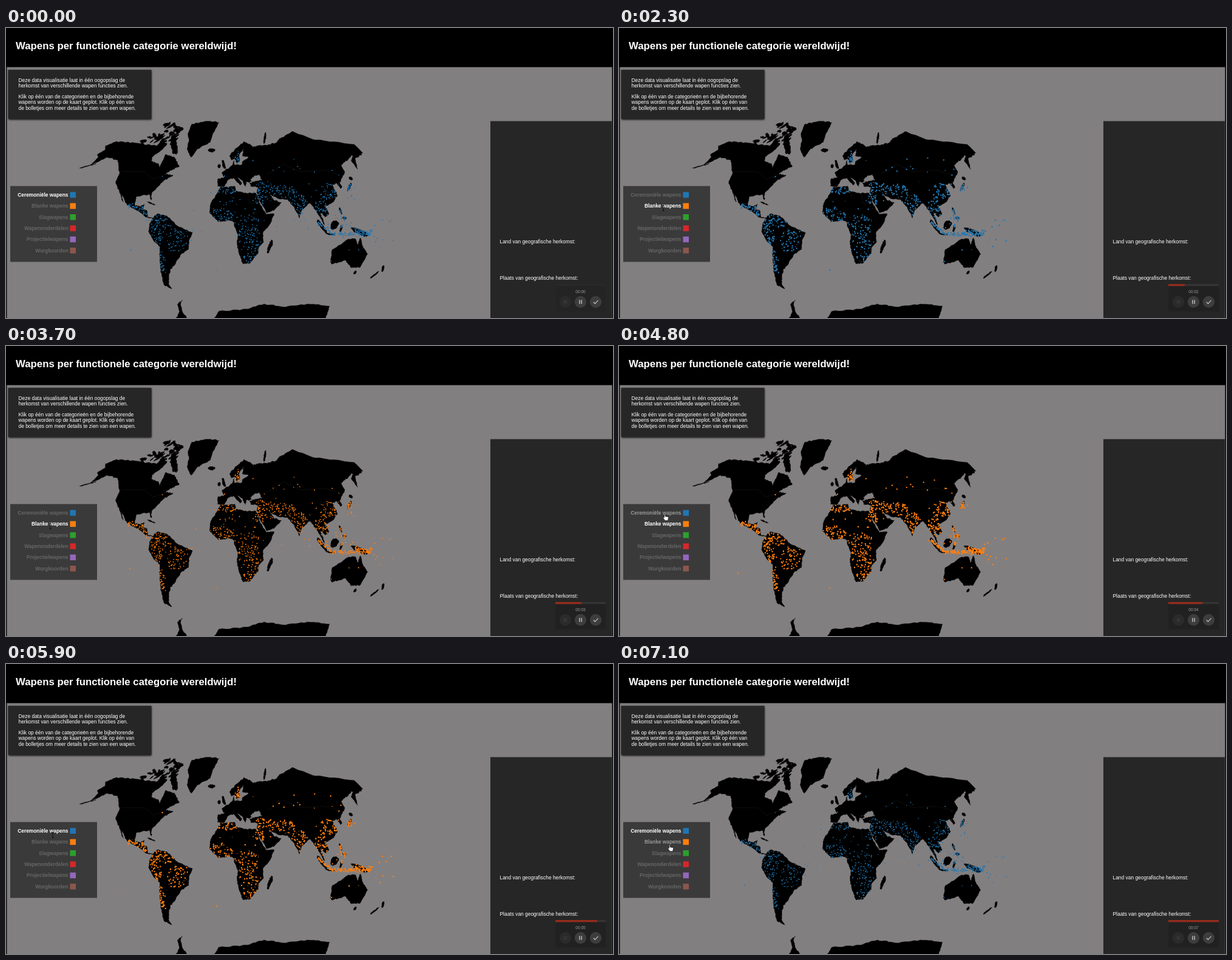
Animation, 1000 px wide and 478 px high, one loop 7.2 s. Source, as an HTML page with a canvas:

```html
<!DOCTYPE html>
<html lang="nl">
<head>
<meta charset="utf-8">
<style>
html, body { margin: 0; width: 100%; height: 100%; overflow: hidden; background: #827f80; }
canvas { display: block; }
</style>
</head>
<body>
<canvas id="stage" width="1000" height="478"></canvas>
<script>
const ctx = document.getElementById('stage').getContext('2d');
const LOOP = 7200, GREY = '#827f80', PANEL = '#262626';
const FONT = '"Liberation Sans", Arial, sans-serif';
const LABELS = ['Ceremoniële wapens', 'Blanke wapens', 'Slagwapens', 'Wapenonderdelen', 'Projectielwapens', 'Wurgkoorden'];
const COLORS = ['#1f77b4', '#ff7f0e', '#2ca02c', '#d62728', '#9467bd', '#8c564b'];
const TO_ORANGE = 1700, TO_BLUE = 5300;

let seed = 11;
const rnd = () => (seed = (seed * 16807) % 2147483647) / 2147483647;
const range = (a, b) => a + (b - a) * rnd();
const clamp = v => Math.max(0, Math.min(1, v));
const mix = (a, b, p) => a + (b - a) * p;
const easeOut = p => 1 - (1 - p) ** 2;
const rows = (str, size) => {
  const n = str.trim().split(/\s+/).map(Number);
  return Array.from({ length: n.length / size }, (_, i) => n.slice(i * size, i * size + size));
};

// longitude, latitude -> stage
const project = (lon, lat) => [
  362 + lon * (1.57 - 6e-5 * lat ** 2 - 4.5e-9 * lat ** 4),
  327 - lat * (1.72 + 5e-5 * lat ** 2)
];

// closed outline with a ragged coast
const shapes = [];
function land(corners) {
  const path = new Path2D();
  corners.forEach(([x, y], i) => {
    const [u, v] = corners[(i + 1) % corners.length];
    const steps = Math.min(8, Math.ceil(Math.hypot(u - x, v - y) / 1.5));
    for (let k = 0; k < steps; k++) {
      const r = k ? 0.45 : 0;
      path.lineTo(...project(mix(x, u, k / steps) + range(-r, r), mix(y, v, k / steps) + range(-r, r)));
    }
  });
  path.closePath();
  shapes.push(path);
}

function isle(lon, lat, long, wide, angle) {
  const turn = angle * Math.PI / 180, c = Math.cos(turn), s = Math.sin(turn);
  land(Array.from({ length: 12 }, (_, i) => {
    const a = i * Math.PI / 6, r = range(0.8, 1.15);
    const u = long * r * Math.cos(a), v = wide * r * Math.sin(a);
    return [lon + u * c - v * s, lat + u * s + v * c];
  }));
}

const CONTINENTS = {
  northAmerica: `-166 68 -156 71 -128 70 -95 68 -92 72 -82 69 -87 64 -94 60 -92 57 -82 55 -79 51.5 -78 62
    -65 60 -56 53 -66 50 -70 47 -61 46 -70 42 -76 36 -81 31 -80 25 -83 30 -97 28 -97 20 -91 18.5 -87 21
    -88 16 -83.5 15 -82 9 -77 8 -83 8.5 -95 16 -105 20 -114 31 -110 23 -117 33 -124 40 -124 48 -135 58
    -150 60 -164 54.5 -162 60 -166 62 -161 65`,
  southAmerica: `-77 8 -72 12 -62 10 -50 0 -35 -6 -39 -14 -40 -22 -48 -26 -57 -36 -62 -39 -66 -46 -68 -52
    -66 -55 -74 -52 -73 -38 -70 -19 -76 -14 -81 -5 -80 1`,
  africa: `-6 36 10 37 11 33 20 31 33 31 37 20 43 11.5 51 12 47 3 39 -6 40 -15 35 -20 35 -25 27 -34
    19 -34.5 15 -27 12 -17 13 -8 9 0 9 4 4 6 -8 4.5 -17 13 -16 22 -10 30`,
  europe: `62 68.5 44 68 34 66.5 40 67 26 71 13 66 5 61 7 58 11 59 14 55.5 17 57 17.5 62 24 65.8 21.5 61
    29 60 21 57 20 54.5 11 54 10 57.5 8 54 -1.5 49.5 -4.5 48.3 -1.5 44 -9 43 -9 37 -2 36.7 3 42.5 9 44
    16 38 18 40 12.5 45 19 42 22 36.8 23 40.5 29 41 28 43 34 46 39 47 41.5 41.5 62 39`,
  asia: `49 45 41.5 42 36 41.5 27 40 28 36.8 36 36.5 34 31 35 28 43 13 52 16 59.5 22.5 51.5 25 48 30 57 26
    67 25 73 18 77.5 8 80 15 90 22 95 16 98.5 10 103.5 1.4 100 13 105 9 109 12 106 19 114 22.5 121.5 29
    119 38 125 39.5 127 35 129 36 128 40 140 49 140 54 155 59 164 62 156 57 157 51 163 59 179 63 179 69
    130 72 105 77.5 80 73 70 70 58 68.6`,
  australia: '114 -22 130 -12 137 -12 140 -17.5 142 -11 146 -19 153 -26 150 -37.5 140 -38 131 -31.5 118 -35 115 -33',
  greenland: '-30 84 -58 82 -58 76 -53 72 -52 66 -44 60 -38 66 -22 70.5 -20 76 -12 83',
  antarctica: '-18 -76 -10 -71 30 -69.5 52 -66 78 -68 110 -66 142 -67.5 152 -76',
  peninsula: '-57 -63.3 -61 -66 -62 -72 -57 -77 -76 -76 -66 -71 -65 -66'
};
Object.values(CONTINENTS).forEach(c => land(rows(c, 2)));

// longitude, latitude, half length, half width, angle
rows(`101 0 8 1.6 -48
110 -7.4 5 .7 -8
114 1 5 3.5 50
121 -2 3.5 1.1 80
141 -5.5 10 2.3 -22
121.5 15 3.5 1 -75
125 8 2 1.5 0
137.5 36.5 5.5 1 42
143 43.5 2 1.4 0
176 -38.5 3.2 1.2 -60
170.5 -44 4 1 45
147 -42 1.5 1.4 0
47 -19 6.5 1.8 70
-2.5 54.5 4 1.5 115
-8 53.3 1.7 1.5 0
-19 65 4.5 1.2 0
-79.5 21.8 4.5 .5 -18
58 73.5 6 1 40
-72 68.5 11 2.8 -40
-167 53.5 8 .4 12`, 5).forEach(r => isle(...r));
// Arctic archipelago
for (let i = 0; i < 30; i++) {
  const lat = range(69.5, 82), west = mix(122, 100, (lat - 69.5) / 13);
  isle(-range(72, west), lat, range(1.5, 6), range(0.4, 1.2), range(-25, 35));
}

const borders = ['-123 49 -95 49 -83 43 -75 45 -68 47', '48 47 61 51 70 55 87 49 116 50 131 47',
  '25 31 25 22 37 22'].map(str => {
  const path = new Path2D();
  rows(str, 2).forEach(p => path.lineTo(...project(...p)));
  return path;
});

const dots = [];
const onLand = (x, y) => shapes.some(s => ctx.isPointInPath(s, x, y));
const addDot = ([x, y]) => dots.push({ x, y, delay: rnd(), roams: rnd() < 0.15 });

function scatter(count, place, sea = 0.03) {
  for (let tries = 0; count > 0 && tries < 2000; tries++) {
    const p = project(...place());
    if (onLand(...p) || rnd() < sea) { addDot(p); count--; }
  }
}

// longitude, latitude, spread both ways
rows(`-100 18 5 3
-88 14 5 4
-67 5 11 5
-74 -9 5 9
-52 -14 9 9
-70 -33 3 8
-5 11 11 6
2 34 10 3
22 0 12 10
28 -22 9 9
37 27 4 6
44 35 11 5
66 33 8 5
79 20 7 9
102 16 6 8
113 32 9 6
137 36 5 3
15 60 3 4
143 -5 8 4
122 8 4 7`, 4).forEach(([lon, lat, w, h]) => scatter(6 * Math.sqrt(w * h), () => {
  const a = range(0, 2 * Math.PI), d = 1.25 * Math.sqrt(rnd());
  return [lon + w * d * Math.cos(a), lat + h * d * Math.sin(a)];
}));
// island arc from Sumatra to New Guinea, thin spread elsewhere
scatter(150, () => {
  const u = rnd();
  return [mix(97, 155, u), mix(-8, 4, clamp(1 - 4 * u)) + range(-1, 1 + 4 * u)];
}, 0.6);
scatter(70, () => [range(-75, 153), range(-35, 60)], 0);
scatter(12, () => [range(155, 178), range(-20, 6)], 1);
rows('-177 -17 -152 -17 -140 -12 -109 -27 -10 -40', 2).forEach(p => addDot(project(...p)));

function drawDots(color, sinceIn, sinceOut) {
  ctx.fillStyle = color;
  ctx.beginPath();
  dots.forEach((d, i) => {
    const grow = easeOut(clamp((sinceIn - d.delay * 900) / 3000));
    const shrink = clamp((sinceOut - 250 - d.delay * 800) / 500);
    const r = 1.2 * grow * (1 - shrink);
    if (r < 0.1) return;
    const from = d.roams ? dots[(i + 60) % dots.length] : d;
    const x = mix(from.x, d.x, grow), y = mix(from.y, d.y, grow);
    ctx.moveTo(x + r, y);
    ctx.arc(x, y, r, 0, 7);
  });
  ctx.fill();
}

function box(x, y, w, h, color) {
  ctx.fillStyle = color;
  ctx.fillRect(x, y, w, h);
}

function text(str, x, y, size, color, weight = '', align = 'left') {
  ctx.font = `${weight} ${size}px ${FONT}`;
  ctx.textAlign = align;
  ctx.fillStyle = color;
  ctx.fillText(str, x, y);
}

function line(color, width, ...strokes) {
  ctx.strokeStyle = color;
  ctx.lineWidth = width;
  ctx.beginPath();
  for (const [start, ...rest] of strokes) {
    ctx.moveTo(...start);
    rest.forEach(p => ctx.lineTo(...p));
  }
  ctx.stroke();
}

function drawMap(t) {
  ctx.save();
  ctx.beginPath();
  ctx.rect(0, 153.5, 798, 325);
  ctx.clip();
  ctx.fillStyle = ctx.strokeStyle = '#000';
  ctx.lineWidth = 0.5;
  shapes.forEach(s => { ctx.fill(s); ctx.stroke(s); });
  ctx.strokeStyle = '#1c1c1c';
  borders.forEach(b => ctx.stroke(b));
  const orangeAge = t - TO_ORANGE;
  const blueAge = (t - TO_BLUE + LOOP) % LOOP;
  const toBlue = t >= TO_BLUE;
  drawDots(COLORS[0], blueAge, toBlue ? 0 : orangeAge);
  drawDots(COLORS[1], orangeAge, toBlue ? blueAge : 0);
  ctx.restore();
}

function drawPanels() {
  box(0, 0, 1000, 64.5, '#000');
  text('Wapens per functionele categorie wereldwijd!', 16, 35, 16.8, '#fff', 'bold');
  ctx.save();
  ctx.shadowColor = '#000';
  ctx.shadowBlur = 3;
  ctx.shadowOffsetY = 1;
  box(3.5, 69, 236, 81, PANEL);
  ctx.restore();
  ['Deze data visualisatie laat in één oogopslag de',
    'herkomst van verschillende wapen functies zien.',
    'Klik op één van de categorieën en de bijbehorende',
    'wapens worden op de kaart geplot. Klik op één van',
    'de bolletjes om meer details te zien van een wapen.'
  ].forEach((s, i) => text(s, 20.5, 88.5 + 9.3 * i + (i > 1 ? 9 : 0), 8.42, '#fff'));
  box(798, 153.5, 200, 325, PANEL);
  text('Land van geografische herkomst:', 813.5, 355, 8.42, '#fff');
  text('Plaats van geografische herkomst:', 813.5, 415, 8.42, '#fff');
  box(0, 64, 1.5, 414, '#111');
  box(998.5, 64, 1.5, 414, '#000');
}

function drawLegend(active, hover) {
  box(7, 260.5, 143, 125, 'rgba(38,38,38,.77)');
  LABELS.forEach((label, i) => {
    const y = 275 + i * 18.35;
    const color = i === active ? '#fff' : i === hover ? '#989898' : '#666';
    text(label, 102.5, y + 3, 8.4, color, 'bold', 'right');
    box(105.5, y - 4.7, 9.5, 9.5, COLORS[i]);
  });
}

function drawRecorder(t) {
  ctx.globalAlpha = clamp(0.35 + t / 700);
  box(905, 422, 83, 45, '#212121');
  box(905, 422, 83, 3.3, '#343434');
  box(905, 422, 83 * t / 7100, 3.3, '#962b1b');
  ctx.globalAlpha = 1;
  const sec = Math.max(0, Math.floor((t - 50) / 1000));
  text('00:0' + sec, 946.5, 436.5, 6.6, '#999', '', 'center');
  ['#2b2b2b', '#3d3d3d', '#3d3d3d'].forEach((c, i) => {
    ctx.fillStyle = c;
    ctx.beginPath();
    ctx.arc(921.5 + 25 * i, 451.5, 9.7, 0, 7);
    ctx.fill();
  });
  line('#4c4c4c', 1, [[918.8, 448.8], [924.2, 454.2]], [[924.2, 448.8], [918.8, 454.2]]);
  line('#c4c4c4', 1.4, [[945, 448.3], [945, 454.7]], [[948.2, 448.3], [948.2, 454.7]]);
  line('#c4c4c4', 1.2, [[967.8, 451.8], [970.4, 454.3], [975.5, 448.8]]);
}

// the pointer rests at a place, then moves on: start, duration, x, y
const moves = [[500, 1, 61, 282], [1100, 500, 73, 297], [4100, 600, 77, 282], [6300, 600, 85, 303]];

function pointer(t) {
  if (t < moves[0][0]) return null;
  let [, , x, y] = moves[0];
  for (const [start, time, toX, toY] of moves) {
    const p = clamp((t - start) / time);
    x = mix(x, toX, p);
    y = mix(y, toY, p);
  }
  return [x, y];
}

function drawPointer([x, y], hand) {
  if (!hand) {
    line('#0a0a0a', 0.9, [[x, y - 4.5], [x, y + 4.5]], [[x - 1.5, y - 4.5], [x + 1.5, y - 4.5]],
      [[x - 1.5, y + 4.5], [x + 1.5, y + 4.5]]);
    return;
  }
  ctx.save();
  ctx.translate(x, y);
  const shape = new Path2D('M-2.6-4.8q.8-.9 1.6 0v3.6l4.6.8q1 .4.9 1.6l-.9 4.6h-4.7l-3.2-4.4q0-1.4 1.7-.4z');
  ctx.strokeStyle = '#222';
  ctx.lineWidth = 0.8;
  ctx.fillStyle = '#fff';
  ctx.fill(shape);
  ctx.stroke(shape);
  ctx.restore();
}

function draw(t) {
  const active = t >= TO_ORANGE && t < TO_BLUE ? 1 : 0;
  const pos = pointer(t);
  const hover = pos ? (pos[1] < 287 ? 0 : 1) : -1;
  box(0, 0, 1000, 478, GREY);
  drawMap(t);
  drawPanels();
  drawLegend(active, hover);
  drawRecorder(t);
  if (pos) drawPointer(pos, hover !== active);
}

const start = performance.now();
function frame() {
  const t = (performance.now() - start) % LOOP;
  draw(Math.floor(t / 100) * 100);
  requestAnimationFrame(frame);
}
frame();
</script>
</body>
</html>
```
